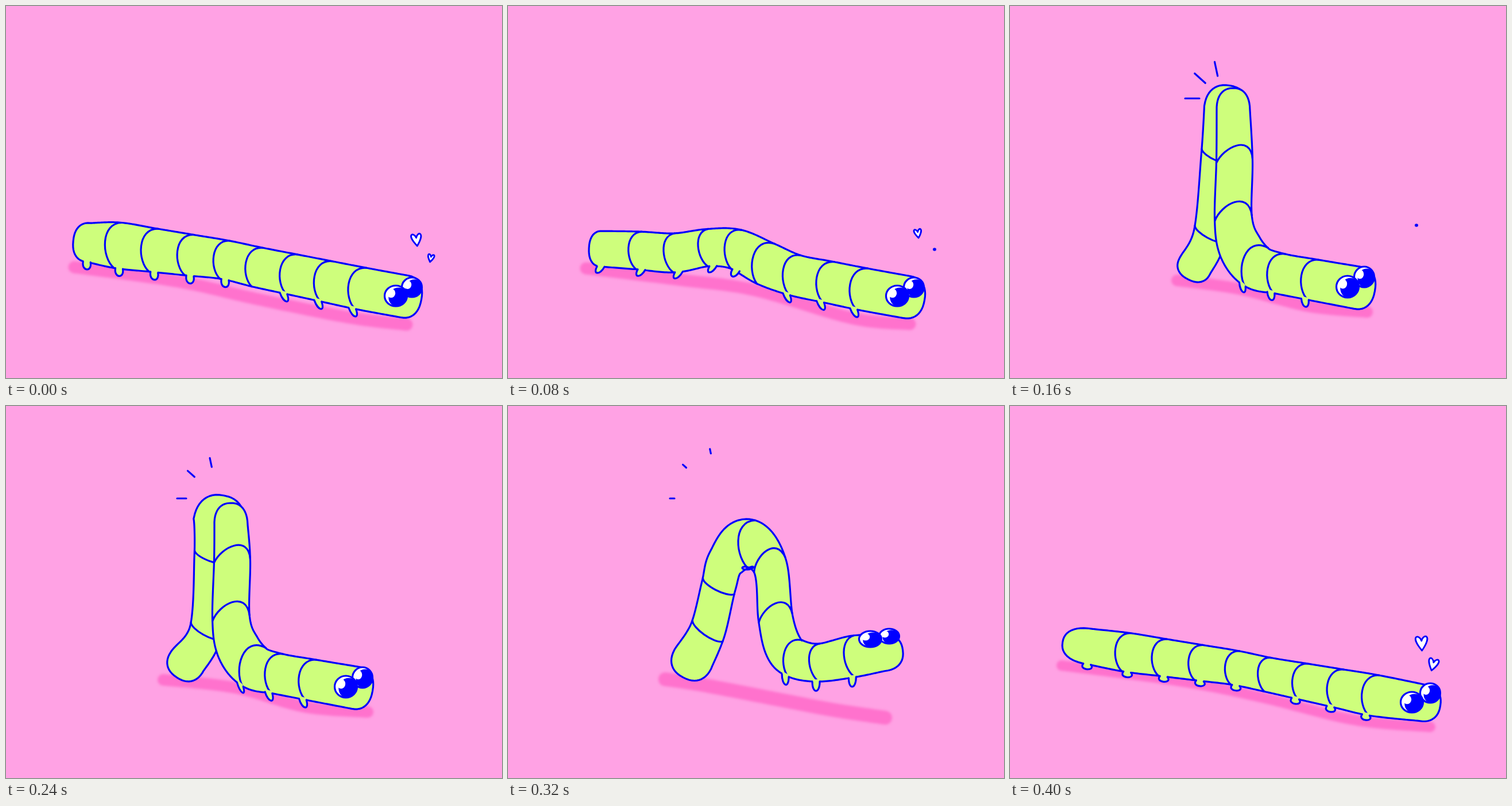
Animation of 864 by 648 pixels, one loop 0.48 s. Source, as an HTML page with a canvas:

```html
<!DOCTYPE html>
<html lang="en">
<head>
<meta charset="utf-8">
<title>Inching caterpillar</title>
<style>
html, body { margin: 0; width: 100%; height: 100%; overflow: hidden; background: #ffa2e4; }
canvas { display: block; }
</style>
</head>
<body>
<canvas id="stage" width="864" height="648"></canvas>
<script>
const ctx = document.getElementById('stage').getContext('2d');
const PINK = '#ffa2e4', SHADE = '#ff72cd', GREEN = '#cefe7c', BLUE = '#0000ff', WHITE = '#fff';
const HOLD = 80, STEPS = 24, PLAIN = true;

const lerp = (a, b, u) => a + (b - a) * u;
const move = ([x, y], [dx, dy], d) => [x + dx * d, y + dy * d];

// A spine is a list of joints [x, y, radius]; a PLAIN joint carries no ring.
const run = (a, b, n) =>
  Array.from({ length: n }, (_, i) => a.map((v, k) => lerp(v, b[k], i / (n - 1))));

// Front half while the back is raised; only the top joint changes height.
const crouch = (dx, top) => ({
  caps: [39, 30],
  spine: [[389, top, 29], [391, 270, 31.5], [389, 369, 32.5], [401, 420, 38, PLAIN], [428, 454, 39],
    [469, 466, 35.5], [528, 477, 36], [606, 491, 37]].map(([x, ...rest]) => [x + dx, ...rest])
});

const poses = [
  {
    shadow: { width: 21, line: [[119, 455], [300, 480], [440, 511], [600, 543], [698, 555]] },
    bodies: [{
      caps: [27, 30],
      spine: [[144, 412, 34], ...run([195, 417, 40], [381, 442, 34], 4),
        ...run([438, 455, 35], [618, 492, 37], 4), [694, 506, 37]]
    }],
    rear: { tilt: 0, drop: 13, spread: 3 },
    front: { tilt: 5, drop: 14, spread: 0 },
    eyes: { x: 679, y: 505, dx: 28, dy: -15, ry: 19 },
    hearts: [[715, 407, 11, -.12], [740, 439, 7, .2]]
  },
  {
    shadow: { width: 21, line: [[136, 457], [300, 477], [430, 495], [600, 544], [700, 554]] },
    bodies: [{
      caps: [22, 32],
      spine: [[163, 423, 31], [228, 426, 33], [290, 430, 34], [348, 421, 32.5], [398, 424, 35],
        [449, 449, 38], ...run([500, 469, 36], [617, 493, 37], 3), [694, 507, 37]]
    }],
    rear: { tilt: -6, drop: 11, spread: 0 },
    front: { tilt: 5, drop: 14, spread: 0 },
    eyes: { x: 678, y: 505, dx: 29, dy: -15, ry: 19 },
    hearts: [[714, 396, 8, -.15]],
    dot: [743, 424]
  },
  {
    shadow: { width: 20, line: [[291, 478], [400, 493], [520, 523], [622, 533]] },
    bodies: [{
      caps: [26, 42],
      spine: [[322, 453, 30], [349, 396, 29], [363, 262, 30], [376, 180, 38]]
    }, crouch(0, 182)],
    front: { tilt: 1, drop: 13, spread: 0 },
    eyes: { x: 588, y: 489, dx: 29, dy: -17, ry: 20 },
    rays: [40, 65],
    dot: [708, 382]
  },
  {
    shadow: { width: 20, line: [[274, 477], [400, 491], [520, 524], [630, 533]] },
    bodies: [{
      caps: [32, 50],
      spine: [[315, 446, 33], [349, 390, 29], [359, 263, 31], [370, 205, 44]]
    }, crouch(3, 208)],
    front: { tilt: 4, drop: 14, spread: 0 },
    eyes: { x: 592, y: 489, dx: 29, dy: -16, ry: 20 },
    rays: [56, 72]
  },
  {
    shadow: { width: 24, line: [[274, 476], [340, 486], [480, 513], [570, 530], [657, 543]] },
    bodies: [{
      caps: [36, 36],
      spine: [[322, 441, 36], [348, 390, 31], [367, 313, 30], [380, 271, 33, PLAIN], [417, 241, 44],
        [456, 278, 30], [466, 369, 30], [480, 420, 33, PLAIN], [501, 440, 34], [543, 447, 33],
        [603, 436, 36], [652, 430, 32]]
    }],
    front: { tilt: 0, drop: 16, spread: 0 },
    eyes: { x: 631, y: 406, dx: 33, dy: -5, ry: 15 },
    rays: [80, 88]
  },
  {
    shadow: { width: 18, line: [[90, 452], [300, 480], [440, 508], [600, 547], [732, 559]] },
    bodies: [{
      caps: [48, 32],
      spine: [[139, 419, 31], ...run([203, 429, 34], [392, 456, 30], 4),
        ...run([449, 468, 30], [634, 504, 36], 4), [718, 517, 32]]
    }],
    rear: { tilt: 0, drop: 9, spread: 10 },
    front: { tilt: 0, drop: 9, spread: 9 },
    eyes: { x: 700, y: 516, dx: 32, dy: -16, ry: 19 },
    hearts: [[717, 413, 13, -.05], [737, 450, 11, .25]]
  }
];

function catmull(a, b, c, d, u) {
  return b + u * ((c - a) + u * ((2 * a - 5 * b + 4 * c - d) + u * (3 * (b - c) + d - a))) / 2;
}

// Smooth samples through all joints.
function sample(joints) {
  const last = joints.length - 1, out = [];
  const at = i => joints[Math.max(0, Math.min(last, i))];
  for (let i = 0; i <= last * STEPS; i++) {
    const j = Math.floor(i / STEPS), u = i / STEPS - j;
    out.push(joints[0].slice(0, 3).map((_, k) =>
      catmull(at(j - 1)[k], at(j)[k], at(j + 1)[k], at(j + 2)[k], u)));
  }
  return out;
}

// Cross-sections of the body: centre, radius, direction, normal and both edges.
function sections(spine) {
  const pts = sample(spine), last = pts.length - 1;
  return pts.map((p, i) => {
    const a = pts[Math.max(0, i - 1)], b = pts[Math.min(last, i + 1)];
    const len = Math.hypot(b[0] - a[0], b[1] - a[1]);
    const t = [(b[0] - a[0]) / len, (b[1] - a[1]) / len], n = [-t[1], t[0]], r = p[2];
    return { p, r, t, n, step: len / 2, top: move(p, n, -r), low: move(p, n, r) };
  });
}

// Rounded end; side is 1 at the head and -1 at the tail.
function cap({ p, r, t, n }, length, side) {
  const soft = v => Math.sign(v) * Math.abs(v) ** .85;
  return Array.from({ length: 23 }, (_, i) => {
    const a = ((i + 1) / 24 - .5) * Math.PI;
    return move(move(p, t, side * length * soft(Math.cos(a))), n, side * r * soft(Math.sin(a)));
  });
}

function polyline(points, closed) {
  const path = new Path2D();
  points.forEach(([x, y]) => path.lineTo(x, y));
  if (closed) path.closePath();
  return path;
}

function ellipse(x, y, rx, ry) {
  const path = new Path2D();
  path.ellipse(x, y, rx, ry, 0, 0, Math.PI * 2);
  return path;
}

function paint(path, fill) {
  ctx.fillStyle = fill;
  ctx.fill(path);
}

// Rings bulge towards the tail, more so where the body heads down.
function drawRing(cuts, i) {
  const { r, t, n, step } = cuts[i];
  const depth = r * (.55 + .3 * t[1]);
  const shift = Math.round(r * (.15 - .35 * t[1]) / 2 / step);
  const a = cuts[i + shift].top, b = cuts[i - shift].low;
  const c = move(move(a, t, -1.6 * depth), n, .1 * r);
  const d = move(move(b, t, -1.05 * depth), n, -.4 * r);
  const path = new Path2D();
  path.moveTo(...a);
  path.bezierCurveTo(...c, ...d, ...b);
  ctx.stroke(path);
  return { p: b, t };
}

function drawBody({ spine, caps }) {
  const cuts = sections(spine), end = cuts[cuts.length - 1];
  const outline = polyline([
    ...cuts.map(s => s.top), ...cap(end, caps[1], 1),
    ...cuts.map(s => s.low).reverse(), ...cap(cuts[0], caps[0], -1)
  ], true);
  paint(outline, GREEN);
  ctx.stroke(outline);
  const feet = [{ p: cuts[0].low, t: cuts[0].t }];
  spine.forEach((joint, j) => {
    if (j && j < spine.length - 1 && joint[3] !== PLAIN) feet.push(drawRing(cuts, j * STEPS));
  });
  return feet;
}

function drawLeg({ p, t }, ahead, { tilt, drop, spread }) {
  const [ax, ay] = move(p, t, ahead - 6.5), [bx, by] = move(p, t, ahead + 6.5), k = 4 / 3;
  const leg = new Path2D();
  leg.moveTo(ax, ay);
  leg.bezierCurveTo(ax + tilt * k - spread, ay + drop * k, bx + tilt * k + spread, by + drop * k, bx, by);
  const patch = new Path2D(leg);
  patch.lineTo(bx - 1, by - 4);
  patch.lineTo(ax + 2, ay - 4);
  paint(patch, GREEN);
  ctx.stroke(leg);
}

function drawEye(x, y, rx, ry) {
  const ball = ellipse(x, y, rx - 1, ry - 1);
  paint(ball, WHITE);
  ctx.save();
  ctx.clip(ball);
  paint(ellipse(x + rx * .24, y + ry * .14, rx * .86, ry * .9), BLUE);
  paint(ellipse(x - rx * .4, y - ry * .25, rx * .36, ry * .42), WHITE);
  ctx.restore();
  ctx.stroke(ball);
}

function drawHeart([x, y, size, tilt]) {
  ctx.save();
  ctx.translate(x, y);
  ctx.rotate(tilt);
  const heart = new Path2D(), s = size;
  heart.moveTo(0, -.3 * s);
  heart.bezierCurveTo(.3 * s, -1.3 * s, 1.6 * s, -1.1 * s, 0, s);
  heart.bezierCurveTo(-1.6 * s, -1.1 * s, -.3 * s, -1.3 * s, 0, -.3 * s);
  paint(heart, WHITE);
  ctx.stroke(heart);
  ctx.restore();
}

function drawRays([inner, outer]) {
  for (const deg of [180, 222, 258]) {
    const dir = [Math.cos(deg * Math.PI / 180), Math.sin(deg * Math.PI / 180)];
    ctx.stroke(polyline([move([370, 161], dir, inner), move([370, 161], dir, outer)]));
  }
}

function drawShadow({ line, width }) {
  ctx.save();
  ctx.filter = 'blur(2px)';
  ctx.strokeStyle = SHADE;
  ctx.lineWidth = width;
  ctx.stroke(polyline(sample(line)));
  ctx.restore();
}

function draw({ shadow, bodies, rear, front, eyes, hearts = [], rays, dot }) {
  ctx.fillStyle = PINK;
  ctx.fillRect(0, 0, 864, 648);
  ctx.lineCap = ctx.lineJoin = 'round';
  drawShadow(shadow);
  ctx.strokeStyle = BLUE;
  ctx.lineWidth = 3.2;

  const feet = bodies.map(drawBody).pop();
  if (rear) feet.slice(0, 5).forEach((f, i) => drawLeg(f, i ? 9 : 0, rear));
  feet.slice(-3).forEach(f => drawLeg(f, -5, front));

  const { x, y, dx, dy, ry } = eyes;
  drawEye(x + dx, y + dy, 18.5, ry - 1);
  drawEye(x, y, 20.5, ry);

  if (rays) drawRays(rays);
  ctx.lineWidth = 2.8;
  hearts.forEach(drawHeart);
  if (dot) paint(ellipse(...dot, 3, 2.8), BLUE);
}

let shown = -1;
function tick() {
  const i = Math.floor(performance.now() / HOLD) % poses.length;
  if (i !== shown) draw(poses[shown = i]);
  requestAnimationFrame(tick);
}
tick();
</script>
</body>
</html>
```
